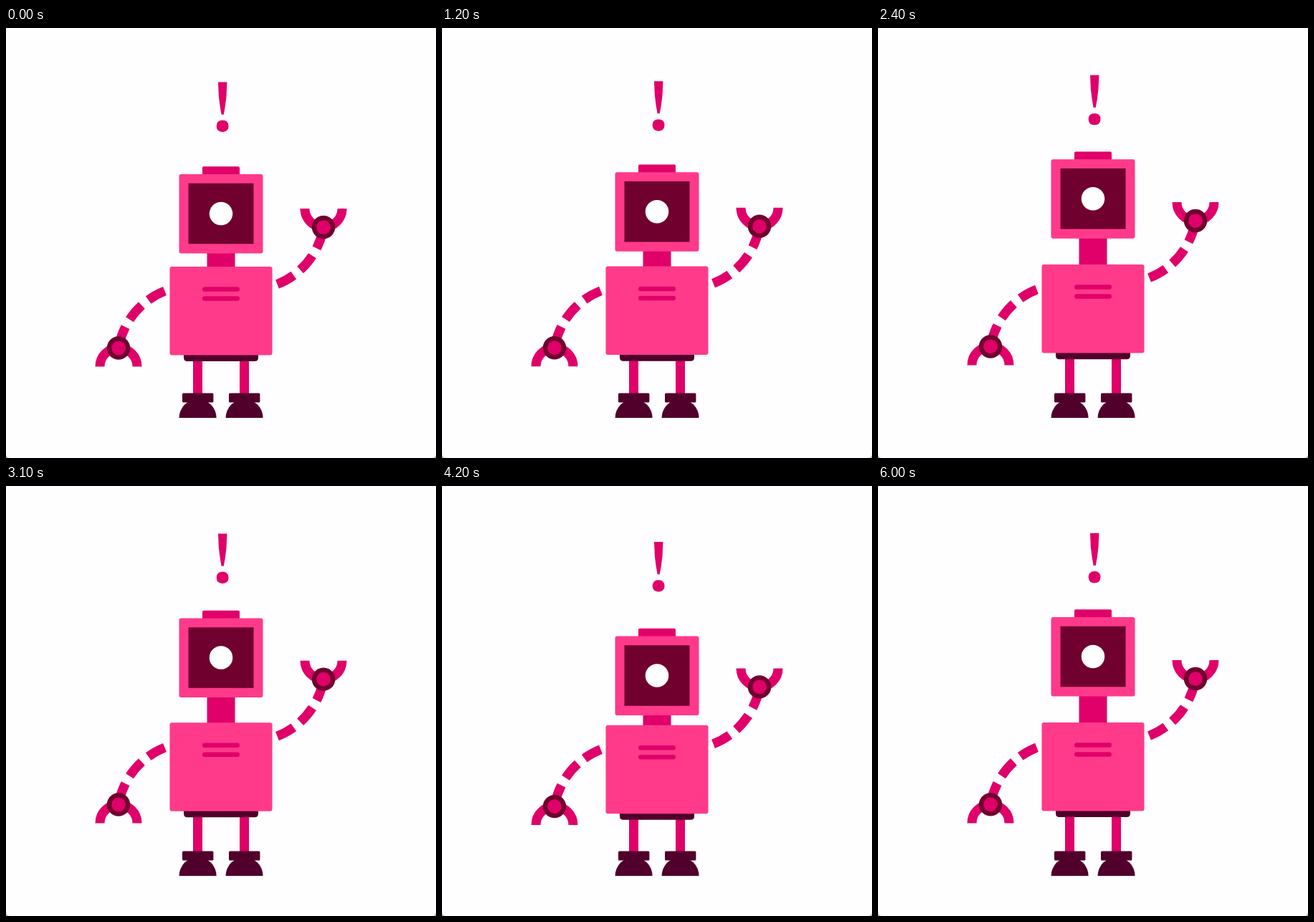
Recreate the animation shown at these times as an HTML page. Size 600x600 px, loop 6.1 s.

```html
<!DOCTYPE html>
<html lang="en">
<head>
<meta charset="utf-8">
<title>Waving robot</title>
<style>
  html, body { margin: 0; width: 100%; height: 100%; overflow: hidden; background: #b4b4b4; }
  svg { display: block; width: 100%; height: 100%; }
  .bright { fill: #ff3a8a; }
  .pink { fill: #e00069; }
  .wine { fill: #70002e; }
  .plum { fill: #50002a; }
  .line { fill: none; stroke: #e00069; stroke-width: 13; }
</style>
</head>
<body>
<svg viewBox="0 0 600 600">
  <defs>
    <g id="arm">
      <path class="line" d="M378.5 357.5A103.5 103.5 0 0 0 443 278" stroke-dasharray="26 12"/>
      <path class="line" d="M417 252a26 26 0 0 0 52 0"/>
      <circle class="wine" cx="443" cy="278" r="16.2"/>
      <circle class="pink" cx="443" cy="278" r="9.8"/>
    </g>
    <g id="leg">
      <rect class="pink" x="261" y="450" width="13" height="62"/>
      <path class="plum" d="M241.6 544a26 26 0 0 1 52 0z"/>
      <rect class="plum" x="246" y="509.5" width="43.4" height="13" rx="1.5"/>
    </g>
  </defs>

  <path fill="#fefdff" d="M0 0H600V594Q600 600 594 600H6Q0 600 0 594z"/>
  <use href="#leg"/>
  <use href="#leg" x="65"/>

  <!-- data-rise: how far each part travels upwards -->
  <g data-rise="15">
    <path class="pink" d="M296 78H308.4L307.5 98Q306 112 303.8 123.2H300.6Q298.400 112 296.900 98z"/>
    <rect class="pink" x="293.800" y="131.300" width="16.600" height="16.200" rx="7.200"/>
  </g>
  <g data-rise="32.5">
    <rect class="pink" x="280.500" y="310" width="39" height="60"/>
    <rect class="pink" x="274" y="198.800" width="52" height="20" rx="2"/>
    <rect class="bright" x="241.500" y="209.500" width="117" height="110.500" rx="3"/>
    <rect class="wine" x="254.500" y="222.300" width="91" height="84.500"/>
    <circle cx="300" cy="264.600" r="16.250" fill="#fff"/>
  </g>
  <g data-rise="4.5">
    <path class="plum" d="M248 450H352V460.800Q352 465.800 347 465.800H253Q248 465.800 248 460.800z"/>
    <rect class="bright" x="228.500" y="333.700" width="143" height="123.500" rx="3"/>
    <path d="M277.250 365.200h45.500m-45.500 13h45.500" stroke="#e00069" stroke-width="6.500" stroke-linecap="round"/>
  </g>
  <g data-rise="14"><use href="#arm" y="2.400"/></g>
  <g data-rise="3.3"><use href="#arm" transform="translate(0 .6) rotate(180 300 362.250)"/></g>
</svg>
<script>
  const LOOP = 6100, STEP = 100;
  const SWING = 4300 / 6;   // one way, up or down
  const START = 0.143;      // part of the first upward swing already done
  const parts = document.querySelectorAll('[data-rise]');

  // cubic-bezier(.25, .1, .25, 1)
  function ease(x) {
    let low = 0, high = 1;
    for (let i = 0; i < 24; i++) {
      const mid = (low + high) / 2;
      if (0.75 * mid * (1 - mid) + mid ** 3 < x) low = mid; else high = mid;
    }
    const s = low, r = 1 - s;
    return 0.3 * s * r * r + 3 * s * s * r + s ** 3;
  }

  function draw(now) {
    const time = Math.floor(((now + 4) % LOOP) / STEP) * STEP;
    const phase = (START + time / SWING) % 2;
    const lift = ease(phase < 1 ? phase : 2 - phase);
    for (const part of parts) {
      part.setAttribute('transform', `translate(0 ${-part.dataset.rise * lift})`);
    }
    requestAnimationFrame(draw);
  }
  draw(performance.now());
</script>
</body>
</html>
```
